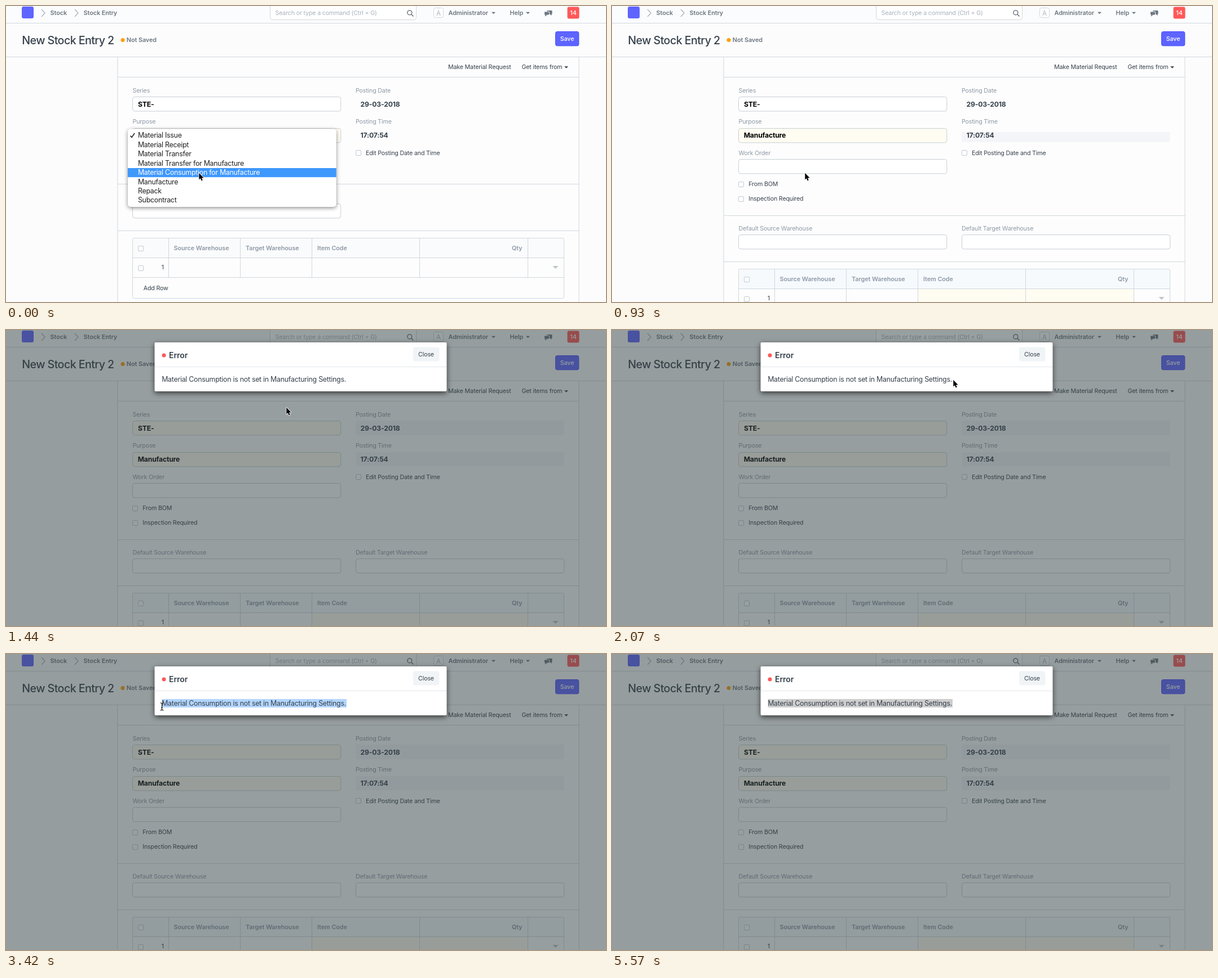
These frames come from a looping animation (1064x526 px, 5670 ms). An HTML page with a canvas:

```html
<!DOCTYPE html>
<html lang="en">
<head>
<meta charset="utf-8">
<title>Stock entry form</title>
<style>
html, body { margin: 0; height: 100%; overflow: hidden; background: #fcfcfc; }
canvas { display: block; }
</style>
</head>
<body>
<canvas id="stage" width="1064" height="526"></canvas>
<script>
const ctx = document.getElementById('stage').getContext('2d');
const LOOP = 5670;
const INK = '#36414c', MUTED = '#8d99a6', LINE = '#d1d8dd', YELLOW = '#fffcf2', GREY = '#f4f5f9';

// Text styles: weight, size, letter spacing
const SMALL = [400, 10.7, -0.18], SMALL_BOLD = [600, 10.8, -0.05];
const BODY = [400, 12.4, -0.27], VALUE = [700, 12.2, -0.18];
const TITLE = [500, 19.6, -0.55], HEADING = [600, 14, -0.05];

const MENU = ['Material Issue', 'Material Receipt', 'Material Transfer', 'Material Transfer for Manufacture',
  'Material Consumption for Manufacture', 'Manufacture', 'Repack', 'Subcontract'];

// Steps: [start time, value...]
const MENU_ALPHA = [[0, 1], [600, 0.35], [750, 0]];
const SELECTION = [[0, 604], [2520, 505], [2670, 333], [2820, 304], [2970, 287], [3120, 276.5]];
const POINTER = [
  [0, 'arrow', 342, 296], [1440, 'arrow', 497, 137], [1620, 'arrow', 501, 120],
  [1770, 'beam', 561, 82], [1920, 'beam', 580, 81], [2070, 'arrow', 605, 88],
  [2220, 'arrow', 615, 90], [2370, 'arrow', 597, 90], [2520, 'beam', 351, 84],
  [2670, 'beam', 312, 84], [2820, 'beam', 287, 84], [2970, 'beam', 274, 85],
  [3120, 'beam', 273, 85], [3420, 'beam', 273, 86], [3720, 'arrow', 423, 220], [3870, 'none', 0, 0]
];
const step = (list, t) => list.filter(s => s[0] <= t).pop().slice(1);

// y is the middle of the capital letters
function text(str, x, y, [weight, size, spacing], color = INK, align = 'left') {
  ctx.font = `${weight} ${size}px Inter, "Open Sans", sans-serif`;
  ctx.letterSpacing = spacing + 'px';
  ctx.textAlign = align;
  ctx.fillStyle = color;
  ctx.fillText(str, x + 0.5, y + size * 0.36);
}

function rect(x, y, w, h, color) {
  ctx.fillStyle = color;
  ctx.fillRect(x, y, w, h);
}

function box(x, y, w, h, r, fill, stroke) {
  ctx.beginPath();
  ctx.roundRect(x, y, w, h, r);
  if (fill) { ctx.fillStyle = fill; ctx.fill(); }
  if (stroke) { ctx.strokeStyle = stroke; ctx.lineWidth = 1; ctx.stroke(); }
}

function dot(x, y, r, color) {
  ctx.beginPath();
  ctx.arc(x, y, r, 0, 7);
  ctx.fillStyle = color;
  ctx.fill();
}

function poly(points, { fill, stroke, width = 1, close = false }) {
  ctx.beginPath();
  points.forEach(([x, y]) => ctx.lineTo(x, y));
  if (close) ctx.closePath();
  ctx.lineWidth = width;
  if (stroke) { ctx.strokeStyle = stroke; ctx.stroke(); }
  if (fill) { ctx.fillStyle = fill; ctx.fill(); }
}

function shadow(color, blur, dy) {
  ctx.shadowColor = color;
  ctx.shadowBlur = blur;
  ctx.shadowOffsetY = dy;
}

const hline = (x, y, w) => rect(x, y, w, 1, LINE);
const vline = (x, y, h) => rect(x, y, 1, h, LINE);
const field = (x, y, fill = '#fff') => box(x + 0.5, y + 0.5, 369.3, 25.4, 4, fill, '#c8cfd5');
const check = (x, y) => box(x + 0.5, y + 0.5, 9, 9, 1.5, '#fff', '#c3cad1');
const caret = (x, y, w, color) => poly([[x - w, y - w / 2], [x + w, y - w / 2], [x, y + w / 2]], { fill: color });

function header() {
  rect(0, 0, 1064, 30, '#fbfcfd');
  hline(0, 30, 1064);
  box(28, 1, 21, 21, 3, '#5e64ff');
  for (const x of [63, 122]) poly([[x, 6], [x + 6, 12.5], [x, 19]], { stroke: '#a5afb9', width: 1.2 });
  text('Stock', 78, 12.5, SMALL_BOLD, '#6c7680');
  text('Stock Entry', 137, 12.5, SMALL_BOLD, '#6c7680');

  box(468.5, -8.5, 259, 33, 4, '#fff', LINE);
  text('Search or type a command (Ctrl + G)', 477, 12.5, SMALL, '#a9b3bc');
  ctx.beginPath();
  ctx.arc(715.8, 11.8, 4, 0, 7);
  ctx.moveTo(718.8, 14.8);
  ctx.lineTo(722.5, 18.5);
  ctx.strokeStyle = '#5c666f';
  ctx.lineWidth = 1.3;
  ctx.stroke();

  box(758.5, 3.5, 17, 17, 3, '#fff', LINE);
  text('A', 766.5, 12.5, [400, 11.5, 0], '#aab4be', 'center');
  text('Administrator', 784, 12, SMALL_BOLD, '#6c7680');
  caret(864.5, 12.5, 3.5, '#6c7680');
  text('Help', 893, 12, SMALL_BOLD, '#6c7680');
  caret(925.5, 12.5, 3.5, '#6c7680');

  box(959, 8, 9.5, 6.5, 1, '#6c7680');
  poly([[964, 14], [967.5, 14], [967.5, 17]], { fill: '#6c7680' });
  box(954.5, 10, 9, 6, 1, '#6c7680', '#fbfcfd');
  poly([[956, 15.5], [960, 15.5], [956, 18.5]], { fill: '#6c7680' });
  box(995.5, 1.5, 21, 21, 3, '#ff5858');
  text('14', 1005.5, 12, [500, 10.8, 0], '#fff', 'center');

  hline(0, 90, 1064);
  text('New Stock Entry 2', 27.8, 60.5, TITLE);
  dot(207, 60.5, 3.5, '#ffa00a');
  text('Not Saved', 213.3, 60.5, SMALL_BOLD, '#6c7680');
  box(974.5, 45.5, 41.3, 25.3, 3, '#5e64ff', '#444bff');
  text('Save', 994.5, 58, [500, 10.7, -0.1], '#fff', 'center');
}

function form(t) {
  const full = t >= 930, settled = t >= 1110;
  const dy = full ? 55.5 : 0;
  rect(198, 91, 818, 435, '#fdfdfd');
  vline(197.5, 91, 435);
  vline(1015.5, 91, 435);
  text('Make Material Request', 783.5, 108.5, SMALL);
  text('Get items from', 914, 108.5, SMALL);
  caret(993.5, 109, 3.5, INK);
  hline(198, 126, 818);

  text('Series', 224, 150, SMALL, MUTED);
  field(224, 161, settled ? YELLOW : '#fff');
  text('STE-', 233.5, 174.5, VALUE, '#000');
  text('Purpose', 224, 205.5, SMALL, MUTED);
  field(224, 217, YELLOW);
  text(full ? MENU[5] : t < 750 ? MENU[0] : MENU[4], 233.2, 230, VALUE, '#000');

  if (settled) rect(620, 161, 369.5, 26, GREY);
  if (full) {
    const top = settled ? 217 : 224;
    rect(620, top, 369.5, 242 - top, GREY);
  }
  text('Posting Date', 619.5, 150, SMALL, MUTED);
  text('29-03-2018', 628, 174.5, VALUE);
  text('Posting Time', 619.5, 205.5, SMALL, MUTED);
  text('17:07:54', 628, 230, VALUE);
  check(620, 256);
  text('Edit Posting Date and Time', 637.5, 261, SMALL);

  if (full) {
    text('Work Order', 224, 261, SMALL, MUTED);
    field(224, 272);
  }
  check(224, Math.round(256.2 + dy));
  text('From BOM', 241.8, 261 + dy, SMALL);
  check(224, Math.round(282.2 + dy));
  text('Inspection Required', 241.8, 287 + dy, SMALL);

  hline(198, Math.round(316.4 + dy), 818);
  text('Default Source Warehouse', 224, 339.8 + dy, SMALL, MUTED);
  field(224, Math.floor(351 + dy));
  if (full) {
    text('Default Target Warehouse', 619.5, 395.3, SMALL, MUTED);
    field(620, 406);
  }
  hline(198, Math.floor(399 + dy), 818);
  table(Math.floor(413 + dy), full);
}

function table(y, full) {
  rect(225, y, 764, 34, full ? '#f6fafd' : '#fafbfc');
  if (full) rect(543, y + 35, 382, 34, YELLOW);
  box(224.5, y - 0.5, 765, 107, 2, null, LINE);
  hline(225, y + 34, 764);
  hline(225, y + 69, 764);
  for (const x of [288, 415, 542, 733, 925]) vline(x, y, 69);
  check(234, y + 13);
  check(234, y + 48);
  [['Source Warehouse', 297], ['Target Warehouse', 424.5], ['Item Code', 551.5]]
    .forEach(([name, x]) => text(name, x, y + 17, SMALL_BOLD, MUTED));
  text('Qty', 915, y + 17, SMALL_BOLD, MUTED, 'right');
  text('1', 279.5, y + 51.5, SMALL, INK, 'right');
  caret(974.5, y + 51.5, 5, '#bcc4cb');
  text('Add Row', 243.3, y + 88, SMALL);
}

function menu(alpha) {
  if (!alpha) return;
  ctx.save();
  ctx.globalAlpha = alpha;
  shadow('rgba(0,0,0,.45)', 7, 2);
  box(216, 218.5, 369.7, 138.5, 5, '#fff');
  shadow('transparent', 0, 0);
  rect(216, 288, 369.7, 16.2, '#3f98fc');
  MENU.forEach((name, i) => text(name, 233.4, 230 + i * 16.42, BODY, i === 4 ? '#fff' : '#222'));
  poly([[220.5, 230.5], [223, 233.5], [228, 226]], { stroke: '#222', width: 1.6 });
  ctx.restore();
}

function dialog(t) {
  rect(0, 0, 1064, 526, 'rgba(51,65,67,.5)');
  ctx.save();
  ctx.translate(0, t < 1260 ? -8.5 : 0);
  shadow('rgba(0,0,0,.65)', 10, 3);
  box(263.5, 22, 518, 87, 2, '#fff');
  shadow('transparent', 0, 0);
  rect(264, 65, 517, 1, '#e3e7ea');
  dot(280, 45, 3.5, '#ff5858');
  text('Error', 288.5, 44.8, HEADING);
  box(722, 30.5, 46.5, 25, 3, '#f0f4f7');
  text('Close', 744.5, 43.5, SMALL, INK, 'center');
  const [start] = step(SELECTION, t);
  rect(start, 80, 604 - start, 15, t < 5570 ? '#b3d5fd' : '#cecece');
  text('Material Consumption is not set in Manufacturing Settings.', 275.7, 88, BODY);
  ctx.restore();
}

function pointer([kind, x, y]) {
  ctx.save();
  ctx.translate(x, y);
  ctx.lineJoin = 'round';
  if (kind === 'arrow') {
    poly([[0.3, 0.8], [0.3, 12.6], [2.9, 10.2], [4.7, 14.5], [6.7, 13.6], [4.9, 9.4], [8.6, 9.4]],
      { fill: '#000', stroke: '#fff', width: 1.6, close: true });
  } else if (kind === 'beam') {
    ctx.beginPath();
    ctx.moveTo(0.5, 0.8);
    ctx.quadraticCurveTo(3, 0.8, 3.5, 2.5);
    ctx.quadraticCurveTo(4, 0.8, 6.5, 0.8);
    ctx.moveTo(3.5, 2.5);
    ctx.lineTo(3.5, 12.5);
    ctx.moveTo(0.5, 14.2);
    ctx.quadraticCurveTo(3, 14.2, 3.5, 12.5);
    ctx.quadraticCurveTo(4, 14.2, 6.5, 14.2);
    ctx.moveTo(2, 9.5);
    ctx.lineTo(5, 9.5);
    ctx.strokeStyle = '#111';
    ctx.lineWidth = 1.1;
    ctx.stroke();
  }
  ctx.restore();
}

const origin = performance.now();
function draw() {
  const t = (performance.now() - origin) % LOOP;
  rect(0, 0, 1064, 526, '#fcfcfc');
  form(t);
  header();
  menu(step(MENU_ALPHA, t)[0]);
  if (t >= 1110) dialog(t);
  pointer(step(POINTER, t));
  requestAnimationFrame(draw);
}
draw();
</script>
</body>
</html>
```
